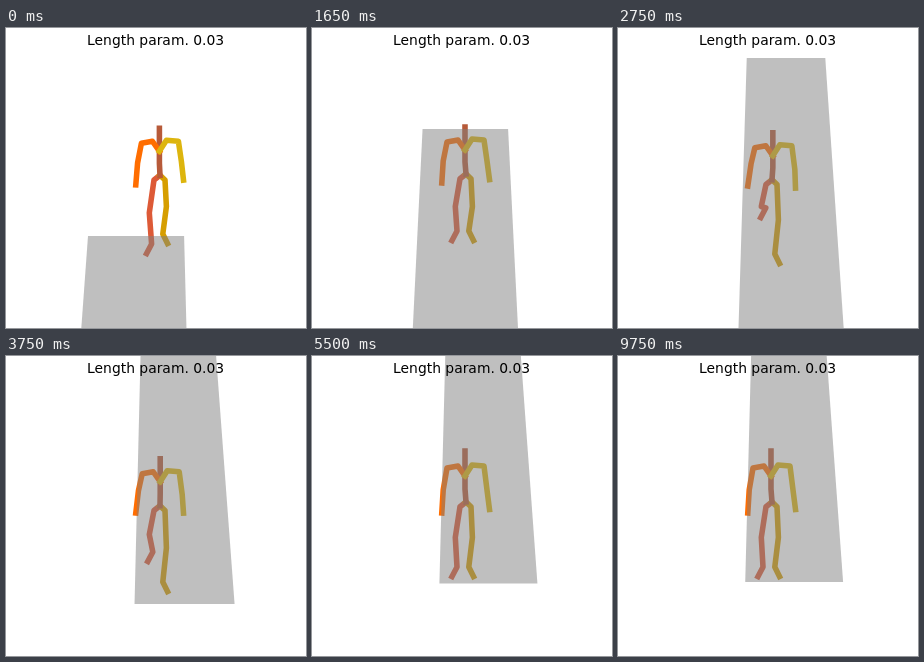
An HTML page with a canvas for the animation above (9800 ms loop, 300 by 300 pixels).

```html
<!DOCTYPE html>
<html lang="en">
<head>
<meta charset="utf-8">
<title>Walking figure</title>
<style>
  html, body { margin: 0; width: 100%; height: 100%; overflow: hidden; background: #fff; }
  canvas { display: block; }
</style>
</head>
<body>
<canvas id="stage" width="300" height="300"></canvas>
<script>
const ctx = document.getElementById('stage').getContext('2d');
const LOOP = 9800, STEP = 50;
const WALK_START = 550, WALK_END = 3750, CYCLE = 880, FULL_STRIDE = 2750;
const VANISH = { x: 153, y: -767 };
const FLOOR_WIDTH = 96.1, FLOOR_DEPTH = 0.34;

// Resting joints: x, y and how far each one sinks when the figure stoops.
const spine = [[153, 95, 2], [153, 103, 1], [153, 120, 1], [153, 133, 0.5], [154, 146, 0]];
const rightArm = [[146, 110, 1], [135, 112, 1], [131.2, 134, -0.5], [129.8, 157, -1]];
const leftArm = [[160, 109, 1], [172, 110, 1], [175, 134, -0.5], [177.5, 153.5, -1]];

// Time and share of the path walked.
const path = [[0, 0], [1000, 0.14], [1650, 0.394], [2750, 0.713],
  [3750, 0.932], [4250, 0.982], [5200, 0.995], [LOOP, 1]];

const clamp = (v, lo, hi) => Math.min(hi, Math.max(lo, v));

function ease(from, to, t) {
  const u = clamp((t - from) / (to - from), 0, 1);
  return u * u * (3 - 2 * u);
}

// Smooth curve through the keys that never overshoots.
function follow(keys, t) {
  let i = 0;
  while (i < keys.length - 2 && t >= keys[i + 1][0]) i++;
  const slope = j => keys[j] && keys[j + 1]
    ? (keys[j + 1][1] - keys[j][1]) / (keys[j + 1][0] - keys[j][0]) : 0;
  const tangent = (a, b) => a * b > 0 ? 2 * a * b / (a + b) : 0;
  const span = keys[i + 1][0] - keys[i][0];
  const u = (t - keys[i][0]) / span;
  const d = slope(i) * span;
  const m0 = tangent(slope(i - 1), slope(i)) * span;
  const m1 = tangent(slope(i), slope(i + 1)) * span;
  return keys[i][1] + u * (m0 + u * (3 * d - 2 * m0 - m1 + u * (m0 + m1 - 2 * d)));
}

function chain(color, points) {
  ctx.strokeStyle = color;
  ctx.beginPath();
  points.forEach(p => ctx.lineTo(...p));
  ctx.stroke();
}

function drawFigure(t) {
  const phase = 2 * Math.PI * (clamp(t, WALK_START, WALK_END) - FULL_STRIDE) / CYCLE;
  const stride = (5 + 18 * ease(WALK_START, 1000, t)) * (1 - ease(WALK_END, 4500, t));
  const swing = stride * Math.cos(phase);
  const dip = 0.25 * Math.abs(swing);
  const sway = 0.08 * Math.abs(swing);
  const stoop = 2 * (1 - ease(WALK_END, 4600, t));
  const ground = 211 - 8 * ease(400, 1000, t) + 8 * ease(FULL_STRIDE, WALK_END, t);

  const bend = (joints, lift = 0) => joints.map(([x, y, sink], i) =>
    [x + sway * (y < 140), y + dip + sink * stoop + (i > 1 ? lift : 0)]);
  const back = bend(spine);
  const [chest, pelvis] = [back[2], back[4]];

  const leg = (color, hipX, kneeX, ankleX, toe, reach) => {
    const y = ground + reach;
    chain(color, [pelvis, [hipX, pelvis[1] + 4.7], [kneeX, 178.5 + 0.7 * Math.max(0, y - 207)],
      [ankleX, y], [ankleX + toe, y + 9.5]]);
  };

  ctx.lineWidth = 5.56;
  ctx.lineCap = 'square';
  ctx.lineJoin = 'round';
  leg('#dd5a37', 148, 143.3, 145 - 0.12 * swing * Math.sign(-swing), -5, -swing);
  leg('#d69e00', 159, 160.4, 156.8, 4.7, swing);
  chain('#b75a39', back);
  chain('#ff6d00', [chest, ...bend(rightArm, -0.12 * swing)]);
  chain('#ddb50e', [chest, ...bend(leftArm, 0.12 * swing)]);
}

function drawFloor(t) {
  const walked = follow(path, t);
  const far = 1.0256 + 0.3214 * walked;
  const near = far - FLOOR_DEPTH;
  const left = -71 + 59.2 * walked - 13.5 * walked ** 8;
  const right = left + FLOOR_WIDTH;
  const corner = (side, depth) =>
    ctx.lineTo(VANISH.x + side / (depth * 0.975), VANISH.y + 1000 / depth);
  ctx.fillStyle = 'rgba(128,128,128,0.5)';
  ctx.beginPath();
  corner(left, far);
  corner(right, far);
  corner(right, near);
  corner(left, near);
  ctx.fill();
}

function draw(t) {
  ctx.fillStyle = '#fff';
  ctx.fillRect(0, 0, 300, 300);
  drawFigure(t);
  drawFloor(t);
  ctx.fillStyle = '#000';
  ctx.font = '13.89px "DejaVu Sans", sans-serif';
  ctx.textAlign = 'center';
  ctx.fillText('Length param. 0.03', 149.6, 17);
}

const begin = performance.now();
function tick() {
  const t = (performance.now() - begin) % LOOP;
  draw(Math.floor(t / STEP) * STEP);
  requestAnimationFrame(tick);
}
tick();
</script>
</body>
</html>
```
